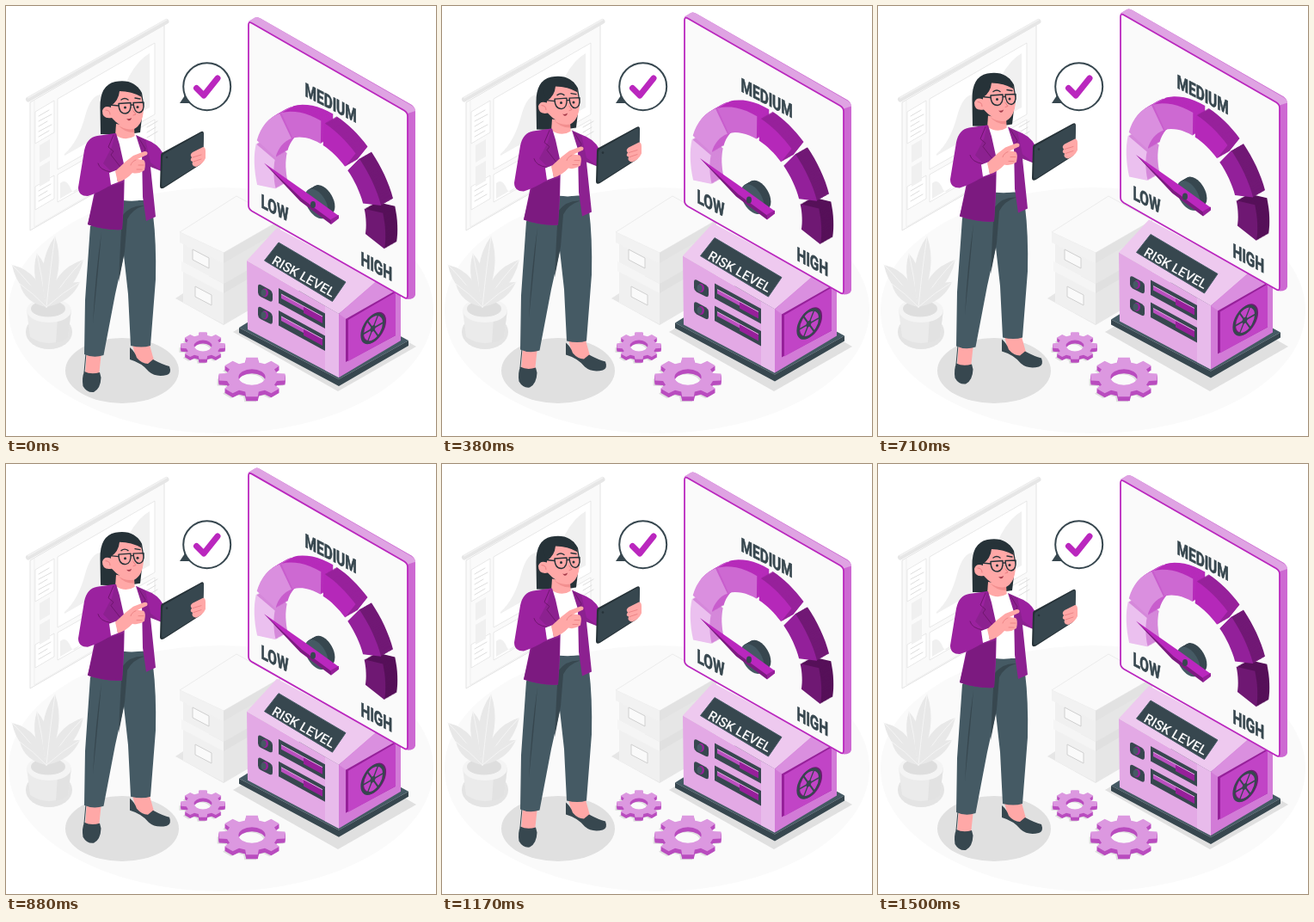
An HTML page that plays this animation: 500x500 px, repeating every 1540 ms.

```html
<!DOCTYPE html>
<html lang="en">
<head>
<meta charset="utf-8">
<title>Risk level</title>
<style>
html, body { margin: 0; width: 100%; height: 100%; overflow: hidden; background: #fff; }
svg { display: block; width: 100%; height: 100%; }
text { font-family: Roboto, Arial, sans-serif; }
.label { font-size: 22px; font-weight: 700; fill: #37474f; stroke: #37474f; stroke-width: .7; }
.dark { fill: #37474f; } .slate { fill: #455a64; } .ink { fill: #263238; }
.skin { fill: #ffa8a7; } .blush { fill: #f28f8f; }
.base { fill: #ba27be; } .jacket { fill: #8c2190; } .sleeve { fill: #9b229f; } .deep { fill: #7c1a80; }
.line { fill: none; stroke-linecap: round; stroke-linejoin: round; }
</style>
</head>
<body>
<svg viewBox="0 0 500 500">
  <ellipse cx="250" cy="354" rx="247" ry="143" fill="#fafafa"/>

  <g id="poster" stroke-linejoin="round">
    <path d="M28 112 184 22V171L28 261Z" fill="#fafafa" stroke="#e4e4e4"/>
    <path d="M33 110V257L184 169" class="line" stroke="#efefef"/>
    <path d="M26 108.500 186.500 18" class="line" stroke="#e6e6e6" stroke-width="6"/>
    <path d="M26 106.500 186.500 16" class="line" stroke="#f1f1f1" stroke-width="2"/>
    <g fill="#fff" stroke="#e4e4e4" stroke-width=".8">
      <path d="M34 123 56 110V147L34 160ZM34 210 56 197V224L34 237ZM60 108 173 43V126L60 190ZM60 196 173 132V164L60 228Z"/>
    </g>
    <path d="M39 162 51 155V175L39 182ZM39 187 51 180V203L39 210ZM68 172 Q84 158 92 128 T116 104 T143 82 Q154 62 167 55V118L68 174Z" fill="#f0f0f0"/>
    <path d="M63 224V206Q70 200 75 212T92 200V207Z" fill="#f0f0f0"/>
    <path d="M38 128 50 121M38 134 53 126M38 140 48 134M38 146 53 138M38 152 50 145M38 215 52 207M38 221 48 215M38 227 52 219M164 141 176 134M164 147 174 141M164 153 176 146" class="line" stroke="#dedede"/>
  </g>

  <g id="plant">
    <ellipse cx="50" cy="379" rx="27" ry="20" fill="#e4e4e4"/>
    <path d="M24 353 28 385Q50 399 72 385L76 353Z" fill="#ebebeb"/>
    <path d="M60 362 58 392Q68 390 72 385L76 353Z" fill="#e2e2e2"/>
    <ellipse cx="50" cy="354" rx="26" ry="14" fill="#f4f4f4"/>
    <ellipse cx="49" cy="352" rx="20" ry="9.500" fill="#dedede"/>
    <g id="leaves"></g>
  </g>

  <g id="boxes">
    <path d="M197 340 253 371 330 326 270 292Z" fill="#e6e6e6"/>
    <path d="M206 306V345L253 370V329Z" fill="#f0f0f0"/>
    <path d="M253 329V370L318 332V290Z" fill="#e6e6e6"/>
    <path d="M204 297 253 323V334L204 308Z" fill="#f5f5f5"/>
    <path d="M253 323V334L318 296V285Z" fill="#e0e0e0"/>
    <path d="M206 272V298L253 323V288Z" fill="#f0f0f0"/>
    <path d="M253 290V323L318 286V255Z" fill="#e6e6e6"/>
    <path d="M202 263 268 221 319 249 253 287Z" fill="#fafafa" stroke="#ececec"/>
    <path d="M202 263 253 287V299L202 275Z" fill="#f2f2f2"/>
    <path d="M253 287V299L319 261V249Z" fill="#e2e2e2"/>
    <path d="M217 283 236 293V305L217 295ZM220 326 239 336V348L220 338Z" fill="#fafafa" stroke="#d0d0d0"/>
  </g>

  <ellipse cx="135" cy="424" rx="66" ry="38" fill="#e0e0e0"/>
  <path d="M264 379 386 448 477 396 355 326Z" fill="#e0e0e0"/>
  <g id="gears"></g>

  <g id="bob">
    <g id="machine">
      <path d="M271 374 387 434 468 389 350 325Z" class="slate"/>
      <path d="M271 374V380L387 442 468 395V389L387 434Z" class="dark"/>
      <path d="M280 296 387 358V432L281 376Z" fill="#e3a9e5"/>
      <path d="M280 296 315 258 433 321 387 358Z" fill="#eec9ef"/>
      <path d="M371 349 387 358V432L371 423.500Z" fill="#e8bbeb"/>
      <path d="M387 358 433 318 459 333V389L387 432Z" fill="#d27bd7"/>
      <path d="M387 358 433 318 459 333 397 365Z" fill="#da8fdf"/>
      <path d="M395 364 453 331V383L395 414Z" fill="#96209a"/>
      <path d="M398 365 453 333V383L398 413Z" fill="#c144c6"/>
      <g transform="matrix(.866 -.5 0 1 426.500 375)" class="line" stroke="#37474f">
        <circle cx="1.500" r="15" stroke="#6f1873" stroke-width="3"/>
        <circle r="14.800" stroke-width="3"/>
        <path d="M-14 0H14M-7-12 7 12M7-12-7 12" stroke-width="1.800"/>
        <circle r="3" class="dark"/>
      </g>
      <path d="M300.500 296 317 275 395 321 379.500 343.500Z" class="dark" stroke="#455a64"/>
      <text transform="matrix(.87 .49 -.5 .85 308 299)" font-size="15.500" font-weight="500" fill="#fafafa">RISK LEVEL</text>
      <g id="controls"></g>
    </g>

    <g id="board">
      <path d="M282 18 291 13Q293 12.500 296 14.500L472 115Q476 118 476 123V336Q475 341 467 341L455 330 300 40Z" fill="#cd69d2"/>
      <path d="M282 18 289 13.500Q292 12 296 14.500L472 116Q476 119 476 122L467 125Z" fill="#dfa3e3"/>
      <path d="M282 22Q282 17.500 286 20L463 121.500Q467 124 467 128V336.500Q467 341.500 463 339L286 238.500Q282 236 282 232Z" fill="#fafafa" stroke="#ba27be" stroke-width="1.800"/>
      <g class="label">
        <text transform="matrix(.7 .365 0 1 347.500 104.500)">MEDIUM</text>
        <text transform="matrix(.7 .365 0 1 296.500 234)">LOW</text>
        <text transform="matrix(.7 .365 0 1 412.500 301)">HIGH</text>
      </g>
      <g id="gauge"></g>
      <g id="hub"></g>
      <path d="M300 182.500 353 219.500 387 244 378 253 344 227Z" class="base"/>
      <path d="M300 182.500 344 224 378 249V254L342 227Z" class="deep"/>
      <path d="M378 248 387 243V247L378 254Z" fill="#961f9a"/>
      <ellipse cx="357" cy="231" rx="3" ry="4" class="dark"/>
    </g>

    <g id="person">
      <path d="M94 402H111L108 430H92ZM147 394H167L172 412 168 418 152 412Z" class="skin"/>
      <path d="M93 404 91 426" class="line" stroke="#37474f"/>
      <path d="M91 425Q99 429 109 426L110.500 432Q110 445 102 449 94 450 89.500 442 88 432 91 425Z" class="dark"/>
      <path d="M144 397Q150 402 152 409 158 416 165 416L171 411Q182 417 190 419 193 427 187 429 174 432 166 425 158 415 144 411Z" class="dark"/>
      <path d="M134 226H162L171 243Q175 275 174 318L168 395Q158 398 145 395L142 335 137 290 127 335 113.500 406Q102 410 91 405L92 342 98 256Z" class="slate"/>
      <path d="M161 232Q147 236 141 248L138 285 131 321Q133 275 135 244Q145 231 161 232ZM111 263Q104 310 101 369Q107 310 111 263Z" class="dark"/>
      <path d="M110 149 109.500 118Q109 92 127 88 149 84 158 101L160 113 156 147Q140 150 110 149Z" class="ink"/>
      <path d="M128 137 149 141 150 156 141 161 127 151Z" class="skin"/>
      <path d="M130 138Q138 145 149 143L149 147Q137 147 130 138Z" class="blush"/>
      <path d="M127 150Q139 158 150 151L160 168V225Q149 228 136 226Z" fill="#fff"/>
      <path d="M122 112Q128 108 131 98 143 99 157 103L160 120Q159 138 149 143 137 143 128 135L123 130Q112 132 112 122 114 115 122 118Z" class="skin"/>
      <path d="M122 116Q131 110 132 99 146 99 158 106L153 94 131 92 117 103Z" class="ink"/>
      <path d="M116 121Q121 121 121 126M148 122 151 126 148 127" class="line" stroke="#e97f82"/>
      <path d="M140 131Q143 132 146 130 145 134 142 133Z" fill="#a73d4c"/>
      <g class="line" stroke="#263238" stroke-width="1.400">
        <path d="M131 113.500 145 112.500Q146 124 139 125 131 125 131 113.500ZM148 112.500 160 112Q161 123 155 124 149 124 148 112.500ZM145 115H148M131 116 121 115M134 109Q138 106 142 109M150 107 156 108"/>
      </g>
      <circle cx="138.500" cy="118" r="1.500" class="ink"/><circle cx="153" cy="117.500" r="1.500" class="ink"/>

      <path d="M151 150 162 155 182 172 183 193 168 187 174 245 163 250 159 222 158 172Z" class="jacket"/>
      <path d="M162 155Q177 160 183 172V193L168 182Z" class="sleeve"/>
      <path d="M128 148 132 161 138 188 137 231 135 260Q114 261 95 254L105 206 103 155Z" class="jacket"/>
      <path d="M105 214 137 205 135 260Q114 261 95 254Z" class="deep"/>
      <path d="M106 151 127 148 123 164 113 183 122 192V208Q108 217 95 221 84 221 84 211L91 168Q94 153 106 151Z" class="sleeve"/>
      <path d="M125 150 119 164 125 169 122 173 136 191M107 183Q109 191 122 193M154 153 162 166 159 173" class="line" stroke="#70166f"/>
      <path d="M120 194 128 191 130 205 122 208Z" fill="#fff"/>
      <path d="M127 192 139 181 148 174 161 169Q166 169 164 173L153 178 160 179Q163 181 161 191 154 196 147 194 140 202 130 205Z" class="skin"/>
      <path d="M151 179Q146 181 145 185M154 185H160M152 190H158" class="line" stroke="#ed8587"/>

      <path d="M181 171 226 146.500Q230 144 230 149L229 178Q229 182 225 185L186 210Q179 215 179 209L180 174Q180 172 181 171Z" class="ink"/>
      <path d="M184 172 226 148Q230 146 230 150L229 178Q229 182 225 184L187 208Q181 213 181 207L182 176Q182 173 184 172Z" class="dark"/>
      <circle cx="187" cy="176" r="1.300" class="ink"/>
      <path d="M229 164Q232 164 232 169V177Q229 184 221 187 215 186 217 181 213 180 216 176 213 173 217 170Z" class="skin"/>
      <path d="M217 176 227 173M218 181 227 178" class="line" stroke="#ed8587"/>
    </g>
  </g>

  <g id="bubble">
    <path d="M202 113 210 101 219 113Z" class="dark"/>
    <circle cx="233.700" cy="93.700" r="27.500" fill="#fff" stroke="#37474f" stroke-width="2"/>
    <path d="M221.500 95.500 230 104 246 84" fill="none" stroke="#ba27be" stroke-width="7" stroke-linejoin="round" stroke-linecap="round"/>
  </g>
</svg>
<script>
const fill = (id, markup) => document.getElementById(id).innerHTML = markup;
const shape = (d, color, dx = 0, dy = 0) =>
  `<path d="${d}" fill="${color}" fill-rule="evenodd" transform="translate(${dx} ${dy})"/>`;
const polygon = points => `M${points.map(p => p.map(v => v.toFixed(1))).join("L")}Z`;
const rad = Math.PI / 180;

// Solid made of stacked slices, drawn from the back to the face.
function extrude(d, face, side, dx, dy, steps) {
  let out = "";
  for (let i = steps; i > 0; i--) out += shape(d, side, dx * i / steps, dy * i / steps);
  return out + shape(d, face);
}

function gear(cx, cy, rx, ry, depth) {
  const points = [];
  for (let a = 0; a < 360; a += 45)
    for (const [da, r] of [[-15, .77], [-10, 1], [10, 1], [15, .77]])
      points.push([cx + rx * r * Math.cos((a + da) * rad), cy + ry * r * Math.sin((a + da) * rad)]);
  const hx = rx * .4, hy = ry * .4;
  const d = polygon(points) + `M${cx - hx} ${cy}a${hx} ${hy} 0 1 0 ${2 * hx} 0a${hx} ${hy} 0 1 0 ${-2 * hx} 0Z`;
  return shape(d, "#dedede", -2, depth + 1) + extrude(d, "#dc98e0", "#b94cbf", 0, depth, depth);
}
fill("gears", gear(229, 395, 26, 16, 4) + gear(286, 431.5, 39, 23, 5));

// Ring sector on the board plane.
function sector(from, to) {
  const points = [], at = (a, r) =>
    points.push([365 + .866 * r * Math.cos(a * rad), 223.5 + r * (.5 * Math.cos(a * rad) - 1.03 * Math.sin(a * rad))]);
  for (let i = 0; i <= 8; i++) at(from + (to - from) * i / 8, 88);
  for (let i = 8; i >= 0; i--) at(from + (to - from) * i / 8, 62);
  return polygon(points);
}
fill("gauge", [
  [197, 167, "#ebc0ef", "#d588da"],
  [164, 128, "#da8fdf", "#c85dcd"],
  [126, 89, "#cd69d2", "#b62bba"],
  [86, 57, "#b528b9", "#97219b"],
  [16, -10, "#6f1873", "#561059"],
  [53, 21, "#93209a", "#711875"]
].map(([from, to, face, side]) => extrude(sector(from, to), face, side, 14, -8, 14)).join(""));

const disc = (x, y, color) => `<circle r="15.5" transform="matrix(.866 .5 0 1 ${x} ${y})" fill="${color}"/>`;
let hub = "";
for (let i = 8; i >= 0; i--) hub += disc(361 + i, 230 - i * .57, i ? "#37474f" : "#455a64");
fill("hub", hub);

const control = y => `<g transform="translate(0 ${y})">
  <path d="M293 327Q293 324 296 325L307 331Q310 333 310 336V342Q310 346 306 344L296 339Q293 337 293 334Z" class="dark"/>
  <ellipse cx="301" cy="334.500" rx="4" ry="5" fill="#96209a"/><ellipse cx="299.500" cy="334.500" rx="3" ry="4" class="slate"/>
  <path d="M317 329 371 358.500V376L317 346.500Z" class="dark"/>
  <path d="M320 336 368 362V367L320 341Z" fill="#ba4fbf"/>
  <path d="M346 350 368 362V370L346 358Z" fill="#96209a"/>
  <path d="M320 336 368 362" stroke="#e3a9e5"/></g>`;
fill("controls", control(-1) + control(25));

// Leaf from its stem base to a tip, with a given half width.
function leaf([x, y, width]) {
  const bx = 47, by = 350, dx = x - bx, dy = y - by, len = Math.hypot(dx, dy);
  const mx = bx + dx * .5, my = by + dy * .6, nx = -dy / len * width, ny = dx / len * width;
  return `<path d="M${bx} ${by}Q${mx + nx} ${my + ny} ${x} ${y}Q${mx - nx} ${my - ny} ${bx} ${by}" fill="#e8e8e8"/>
    <path d="M${bx} ${by}Q${mx} ${my} ${x} ${y}" class="line" stroke="#f5f5f5"/>`;
}
fill("leaves", [[7, 301, 18], [90, 295, 18], [36, 288, 15], [57, 268, 18], [86, 321, 15], [16, 323, 15]].map(leaf).join(""));

const LOOP = 1540, RISE = 700, END = 1500, HEIGHT = 9.5;
const bob = document.getElementById("bob");
function draw(now) {
  const t = Math.min(now % LOOP, END);
  const phase = t < RISE ? t / RISE : (END - t) / (END - RISE);
  const lift = HEIGHT * (1 - Math.cos(Math.PI * phase)) / 2;
  bob.setAttribute("transform", `translate(0 ${-lift.toFixed(2)})`);
  requestAnimationFrame(() => draw(performance.now()));
}
draw(performance.now());
</script>
</body>
</html>
```
